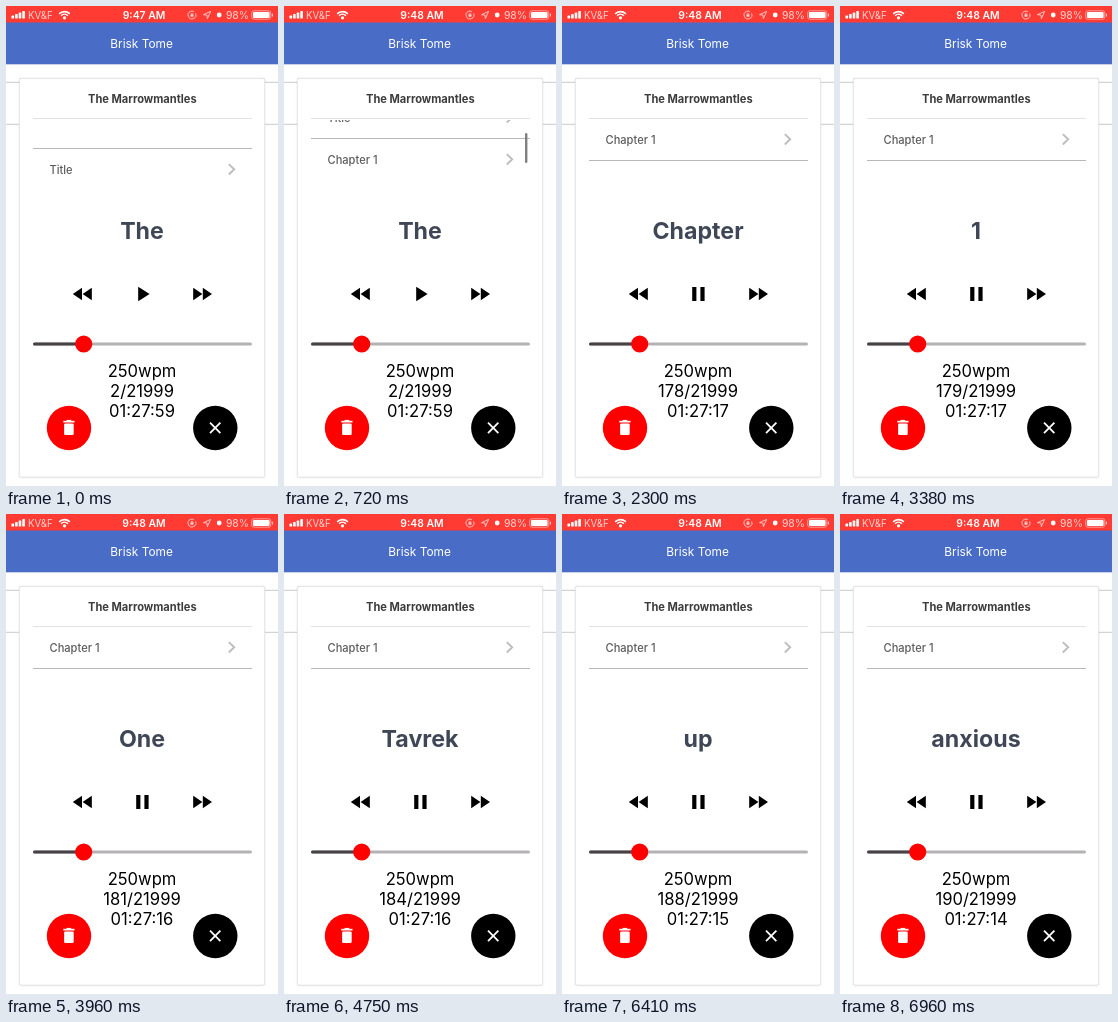
An HTML page with a canvas for the animation above (7.06 s loop, 272 by 480 pixels).

```html
<!DOCTYPE html>
<html lang="en">
<head>
<meta charset="utf-8">
<title>Speed reader</title>
<style>
html, body { margin: 0; width: 100%; height: 100%; overflow: hidden; background: #fff; }
canvas { display: block; width: 272px; height: 480px; }
</style>
</head>
<body>
<canvas id="stage"></canvas>
<script>
const W = 272, H = 480, LOOP = 7060, TOTAL = 21999, WPM = 250;
const DIM = '#ffd2cf';
const canvas = document.getElementById('stage');
const ctx = canvas.getContext('2d');
const ratio = window.devicePixelRatio || 1;
canvas.width = W * ratio;
canvas.height = H * ratio;

// Each step overrides part of the state from its start time on.
const steps = [
  { at: 0, clock: '9:47 AM', scroll: 0, bar: 0, word: 'The', index: 2, playing: false },
  { at: 100, scroll: 30, bar: 1 },
  { at: 720, clock: '9:48 AM', scroll: 52 },
  { at: 1600, scroll: 72 },
  { at: 2100, bar: 0.5 },
  { at: 2200, bar: 0, word: 'Chapter', index: 178 },
  { at: 2300, playing: true },
  { at: 3380, word: '1', index: 179 },
  { at: 3960, word: 'One', index: 181 },
  { at: 4480, word: 'morning,', index: 182 },
  { at: 4750, word: 'Tavrek', index: 184 },
  { at: 5570, word: 'Wenlo', index: 185 },
  { at: 5840, word: 'was', index: 186 },
  { at: 6410, word: 'up', index: 188 },
  { at: 6960, word: 'anxious', index: 190 }
];

function stateAt(t) {
  return Object.assign({}, ...steps.filter(s => s.at <= t));
}

function remaining(index) {
  const s = Math.round((TOTAL - index) * 60 / WPM);
  return [s / 3600, s / 60 % 60, s % 60]
    .map(v => String(Math.floor(v)).padStart(2, '0')).join(':');
}

function rect(x, y, w, h, color) {
  ctx.fillStyle = color;
  ctx.fillRect(x, y, w, h);
}

function disc(x, y, r, color) {
  ctx.fillStyle = color;
  ctx.beginPath();
  ctx.arc(x, y, r, 0, Math.PI * 2);
  ctx.fill();
}

function round(x, y, w, h, r, color) {
  ctx.fillStyle = color;
  ctx.beginPath();
  ctx.roundRect(x, y, w, h, r);
  ctx.fill();
}

function trace(points) {
  ctx.beginPath();
  points.forEach(([x, y], i) => i ? ctx.lineTo(x, y) : ctx.moveTo(x, y));
}

function poly(points, color) {
  trace(points);
  ctx.closePath();
  ctx.fillStyle = color;
  ctx.fill();
}

function line(points, color, width) {
  trace(points);
  ctx.strokeStyle = color;
  ctx.lineWidth = width;
  ctx.stroke();
}

function text(str, x, y, size, color, weight = 400, align = 'center') {
  ctx.font = `${weight} ${size}px Inter, Roboto, sans-serif`;
  ctx.textAlign = align;
  ctx.fillStyle = color;
  ctx.fillText(str, x, y);
}

function arc(x, y, r, from, to, width, color) {
  ctx.beginPath();
  ctx.arc(x, y, r, from, to);
  ctx.strokeStyle = color;
  ctx.lineWidth = width;
  ctx.stroke();
}

function statusBar(clock) {
  rect(0, 0, W, 16.5, '#ff3b34');
  for (let i = 0; i < 4; i++) {
    const h = 3 + i * 1.5;
    round(5.5 + i * 3.6, 12.6 - h, 2.6, h, 0.6, '#fff');
  }
  text('KV&F', 22, 12.6, 9.7, DIM, 400, 'left');
  const up = -Math.PI / 2;
  for (const r of [7.4, 4.7]) arc(58.5, 13, r, up - 0.8, up + 0.8, 1.6, '#fff');
  disc(58.5, 11.8, 1.6, '#fff');

  text(clock, 138, 12.8, 10.4, '#fff', 600);

  arc(186, 9, 3.9, -0.4, 5.2, 0.9, DIM);
  rect(184.5, 8.3, 3, 2.4, DIM);
  arc(186, 8.2, 1, Math.PI, 0, 0.6, DIM);
  trace([[204.6, 5.4], [201.4, 12.6], [201, 9.1], [197.5, 8.7]]);
  ctx.closePath();
  ctx.strokeStyle = DIM;
  ctx.lineWidth = 0.9;
  ctx.stroke();
  disc(213.2, 9, 2.4, '#fff');
  text('98%', 243, 12.8, 10.4, DIM, 400, 'right');

  ctx.beginPath();
  ctx.roundRect(245.8, 4.8, 19, 8.4, 2);
  ctx.strokeStyle = '#ffb5b1';
  ctx.lineWidth = 0.8;
  ctx.stroke();
  round(247, 6, 16.6, 6, 1, '#fff');
  round(265.8, 7.5, 1.2, 3, 0.6, '#ffc5c2');
}

function card() {
  rect(0, 75.8, W, 1, '#cacaca');
  rect(0, 117.8, W, 1, '#cacaca');
  ctx.save();
  ctx.shadowColor = 'rgba(0,0,0,0.12)';
  ctx.shadowBlur = 2 * ratio;
  round(13, 72, 246, 399.5, 2, '#dedede');
  ctx.restore();
  round(13.7, 72.7, 244.6, 398.1, 1.6, '#fff');
  text('The Marrowmantles', 136.3, 96.6, 11.1, '#3c3c3c', 700);
  rect(27, 112, 219, 1, '#e3e3e3');
}

function list(scroll, bar) {
  ctx.save();
  ctx.beginPath();
  ctx.rect(27, 114, 219, 56);
  ctx.clip();
  const top = 142 - scroll;
  rect(27, top, 219, 1, '#b8b8b8');
  ['Title', 'Chapter 1'].forEach((label, i) => {
    const y = top + i * 42;
    text(label, 43.5, y + 25.5, 11.1, '#5c5c5c', 500, 'left');
    line([[222.8, y + 16.1], [228.2, y + 21.3], [222.8, y + 26.5]], '#bdbdbd', 1.9);
    rect(27, y + 42, 219, 1, '#b8b8b8');
  });
  ctx.globalAlpha = bar;
  round(241, 114 + scroll / 4, 2.4, 30, 1.2, '#808080');
  ctx.restore();
}

function arrow(x, dir, w, h) {
  poly([[x, 288 - h], [x + dir * w, 288], [x, 288 + h]], '#000');
}

function controls(playing) {
  arrow(76, -1, 9.2, 6.3);
  arrow(85.8, -1, 9.2, 6.3);
  arrow(187.2, 1, 9.2, 6.3);
  arrow(196.8, 1, 9.2, 6.3);
  if (playing) {
    rect(130.2, 281, 4.2, 14, '#000');
    rect(138.4, 281, 4.2, 14, '#000');
  } else {
    arrow(132.2, 1, 11.4, 7.2);
  }
}

function slider() {
  round(27, 336.4, 219, 3.2, 1.6, '#b4b2b4');
  round(27, 336.4, 51, 3.2, 1.6, '#464246');
  disc(77.7, 338, 8.6, '#ff0000');
}

function buttons() {
  disc(63, 422, 22.2, '#ff0000');
  round(58.1, 417.5, 9.6, 11.4, 1.2, '#fff');
  rect(57.3, 414.8, 11.2, 1.7, '#fff');
  rect(60.6, 413.9, 4.6, 1.4, '#fff');

  disc(209.3, 422, 22.2, '#000');
  line([[204, 416.7], [214.4, 427.1]], '#fff', 1.8);
  line([[214.4, 416.7], [204, 427.1]], '#fff', 1.8);
}

function draw(t) {
  const s = stateAt(t);
  ctx.setTransform(ratio, 0, 0, ratio, 0, 0);
  rect(0, 0, W, H, '#fff');
  rect(0, 16, W, 42.3, '#496cc6');
  statusBar(s.clock);
  text('Brisk Tome', 135.6, 42.3, 11.9, '#fff');
  card();
  list(s.scroll, s.bar);
  text(s.word, 136, 233, 23.2, '#3f4757', 700);
  controls(s.playing);
  slider();
  buttons();
  [WPM + 'wpm', s.index + '/' + TOTAL, remaining(s.index)]
    .forEach((str, i) => text(str, 136, 371.2 + i * 20.1, 16.6, '#000'));
}

const start = performance.now();
function tick() {
  draw((performance.now() - start) % LOOP);
  requestAnimationFrame(tick);
}
tick();
</script>
</body>
</html>
```
